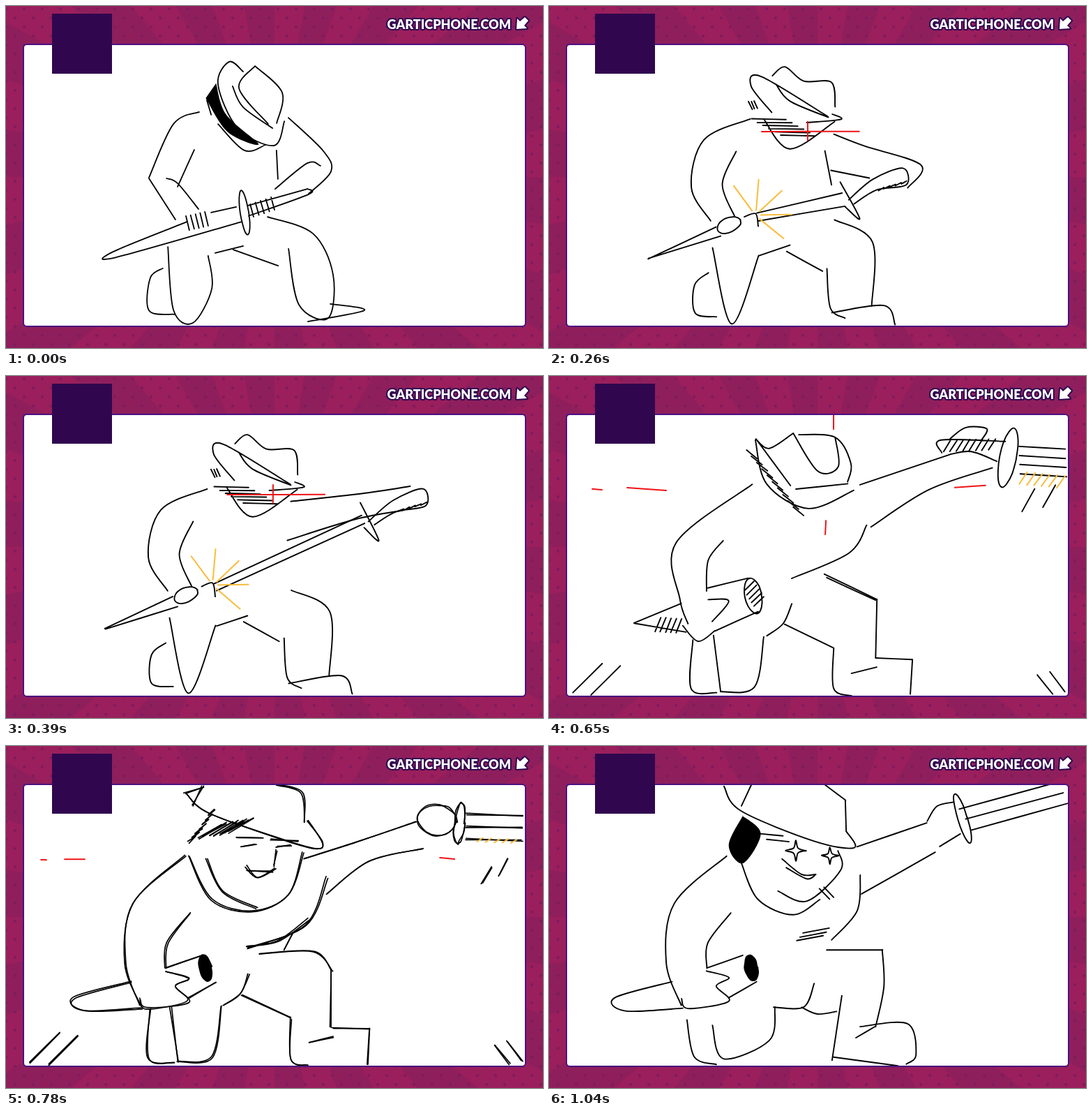
Write an HTML page with a canvas that moves like this. It is 770 by 490 pixels and loops after 1670 ms.

```html
<!DOCTYPE html>
<html lang="en">
<head>
<meta charset="utf-8">
<title>Drawing the sword</title>
<style>
html, body { margin: 0; width: 100%; height: 100%; overflow: hidden; background: #9a1f5c; }
canvas { display: block; }
</style>
</head>
<body>
<canvas id="stage" width="770" height="490"></canvas>
<script>
const STEP = 130, LOOP = 1670, LAST = 8;
const RED = '#ee1418', GOLD = '#f8bd3c', NIGHT = '#30074f';
const ctx = document.getElementById('stage').getContext('2d');

let seed = 1;
const rand = () => (seed = seed * 16807 % 2147483647) / 2147483647;

// A sketch is a list of strokes, a stroke a flat list of coordinates.
const line = s => s.split(';').map(p => p.trim().split(/\s+/).map(Number));
const move = (sketch, dx, dy) => sketch.map(p => p.map((v, i) => v + (i % 2 ? dy : dx)));
const hatch = (x1, y1, x2, y2, dx, dy, n) =>
  Array.from({ length: n }, (_, i) => {
    const k = i / (n - 1), x = x1 + (x2 - x1) * k, y = y1 + (y2 - y1) * k;
    return [x, y, x + dx, y + dy];
  });
const ring = (x, y, rx, ry, tilt) => [Array.from({ length: 13 }, (_, i) => {
  const a = i * Math.PI / 6, u = rx * Math.cos(a), v = ry * Math.sin(a);
  return [x + u * Math.cos(tilt) - v * Math.sin(tilt), y + u * Math.sin(tilt) + v * Math.cos(tilt)];
}).flat()];
const star = (x, y, r) => [Array.from({ length: 9 }, (_, i) => {
  const a = i * Math.PI / 4, d = i % 2 ? r / 3 : r;
  return [x + d * Math.cos(a), y + d * Math.sin(a)];
}).flat()];
const fan = (x, y, from, to, near, far, n) =>
  Array.from({ length: n }, (_, i) => {
    const a = from + (to - from) * i / (n - 1), c = Math.cos(a), s = Math.sin(a);
    return [x + near * c, y + near * s, x + far * c, y + far * s];
  });

// Catmull-Rom curve through the points
function trace(p, shake) {
  const q = p.map(v => v + (rand() - 0.5) * 2 * shake);
  const last = q.length / 2 - 1;
  const at = (i, axis) => q[2 * Math.max(0, Math.min(last, i)) + axis];
  const bend = (i, side, axis) => at(i, axis) + side * (at(i + 1, axis) - at(i - 1, axis)) / 6;
  ctx.moveTo(q[0], q[1]);
  for (let i = 0; i < last; i++) {
    ctx.bezierCurveTo(bend(i, 1, 0), bend(i, 1, 1), bend(i + 1, -1, 0), bend(i + 1, -1, 1), at(i + 1, 0), at(i + 1, 1));
  }
}

function ink(sketch, color, width, shake) {
  ctx.strokeStyle = color;
  ctx.lineWidth = width;
  ctx.beginPath();
  sketch.forEach(p => trace(p, shake));
  ctx.stroke();
}

const kneel = {
  hat: line(`340 94 320 80 304 112 332 175 384 200 399 165; 376 169 334 118 357 86; 357 86 396 124 388 168;
    325 115 340 145 382 175; 304 169 342 207 372 199; 288 135 294 156`),
  shade: line('302 110 316 156 362 198 318 180 286 132'),
  arms: line(`277 152 240 169 205 246; 205 247 243 306; 270 206 246 259; 230 247 246 254 276 291;
    405 160 455 208 466 237 434 269; 451 229 432 225 386 262; 388 207 390 248`),
  sword: [...line('260 309 154 352 158 360 338 309; 346 286 432 262; 432 262 434 270 348 301; 294 296 330 288'),
    ...ring(342, 296, 6, 32, -0.15), ...hatch(258, 301, 285, 295, 5, 20, 5), ...hatch(350, 284, 380, 274, 5, 18, 5)],
  legs: line(`375 302 440 326 469 385 462 447 420 428 405 348; 465 427 514 436 433 452; 300 354 340 344; 326 349 390 372;
    232 345 240 436 268 454 295 405 290 358; 225 376 207 390 205 436 242 442`)
};

const grasp = {
  hat: [...line(`320 152 290 115 304 101 400 158; 320 100 338 87 365 108 405 109 410 145; 406 155 418 162 370 167;
    325 112 345 136 400 159; 308 162 345 205 410 166`),
    ...hatch(286, 137, 294, 136, 5, 11, 3), ...hatch(290, 162, 332, 185, 50, 1, 6)],
  arm: [...line('288 162 222 192 204 260 232 308; 268 208 249 255 267 302'), ...ring(258, 314, 18, 10, -0.4)],
  reach: line('408 184 452 200 534 228 515 260; 404 235 460 246; 396 207 405 256'),
  hand: [...line('430 278 465 248 508 232 512 256 470 264 438 283; 418 252 445 305 424 287'), ...hatch(472, 264, 505, 255, 8, -4, 5)],
  sheath: line('239 316 142 362; 142 362 246 330; 280 302 296 297 300 316'),
  blade: line('298 297 420 268; 300 308 424 287'),
  legs: line(`409 307 464 338 463 430; 341 352 392 380; 399 376 403 432 424 447; 405 440 480 429 496 456; 302 358 346 343;
    235 347 262 455 301 358; 229 382 209 400 209 440 240 445`),
  gold: fan(296, 300, -2.2, 0.7, 8, 52, 5)
};

const turned = line('291 155 182 239 188 320 199 355; 250 236 228 264 226 308');
const dashes = line('408 56 408 76; 397 207 396 227');

const slash = {
  hat: [...line('300 104 345 80 436 118 442 146 385 199 325 158 300 104; 312 100 348 150 440 146; 350 86 370 130 435 124'),
    ...hatch(286, 90, 330, 180, 14, 16, 9)],
  arms: [...line('444 152 560 122 625 110; 442 206 480 196 570 150 640 138'), ...ring(650, 107, 28, 18, -0.2), ...ring(216, 343, 17, 22, 0),
    ...hatch(648, 98, 664, 94, 90, 94, 2)],
  sword: line('232 308 298 293 440 258; 350 309 240 340; 196 354 122 362; 122 362 188 330'),
  cuts: [...hatch(370, 285, 480, 335, 265, -105, 7), ...hatch(345, 290, 440, 262, 120, 48, 4),
    ...hatch(500, 190, 650, 150, -60, 120, 5), ...hatch(470, 205, 600, 148, 6, 26, 10)],
  speed: [...hatch(36, 110, 110, 95, 50, 28, 3), ...hatch(50, 457, 131, 456, 50, -65, 4), ...hatch(643, 378, 700, 395, 40, 46, 2)],
  legs: line(`238 342 250 440 300 425 312 370 348 356 412 388; 404 385 404 440 420 456; 438 312 466 345 466 408;
    466 408 514 440 508 456; 234 373 212 395 218 447 250 445`),
  gold: [...hatch(330, 284, 465, 326, 300, -120, 9), ...hatch(660, 165, 705, 215, 34, -8, 6)],
  red: line('26 163 80 158; 125 159 207 159; 240 156 268 155; 386 432 384 458; 578 146 630 144')
};

const corners = [...hatch(34, 454, 60, 457, 42, -42, 2), ...hatch(700, 428, 718, 424, 22, 28, 2)];
const crouch = line(`236 372 246 452; 206 378 204 448 240 454; 246 452 295 446 308 374; 348 326 336 355 312 372;
  338 356 408 390; 408 390 408 448 434 458; 468 404 521 406; 521 406 518 456; 434 426 470 417`);

const follow = {
  hat: [...line('297 90 316 104 350 82; 297 90 346 157; 358 84 410 88 433 125 428 152; 350 82 385 136 415 130 410 88; 354 162 428 154; 296 92 312 155 372 190 437 164'),
    ...hatch(283, 106, 350, 188, 15, 12, 10)],
  arms: [...line(`446 156 575 112; 462 216 545 163 636 132; 455 214 430 254 348 290; 575 112 605 108 642 122;
    575 90 598 74 628 76 620 92; 563 110 562 92 654 94`), ...hatch(566, 108, 630, 106, 10, -16, 8)],
  blade: [...ring(658, 117, 12, 43, 0.2), ...hatch(674, 101, 676, 140, 66, 4, 4), ...hatch(678, 194, 708, 188, 18, -32, 2)],
  sheath: [...line('228 304 286 290; 300 338 238 365; 192 358 214 380 238 365; 196 367 122 354; 122 354 190 326; 228 320 258 322 234 352'),
    ...ring(293, 315, 12, 26, -0.2), ...hatch(280, 308, 294, 330, 14, -14, 5), ...hatch(152, 366, 182, 368, 8, -20, 5)],
  thigh: line('395 284 470 320; 470 320 468 404; 398 289 468 321'),
  gold: hatch(674, 155, 728, 160, 12, -17, 6),
  red: line('62 162 76 163; 112 160 168 164; 582 160 626 157')
};

const smirk = {
  hat: [...line('258 68 290 95 400 136 444 148 455 138 432 108; 256 68 282 58; 282 58 268 86; 388 56 424 68 428 110'),
    ...hatch(262, 138, 290, 100, 10, -8, 7), ...hatch(276, 132, 320, 124, 34, -20, 7)],
  face: [...line('262 158 295 220 352 237 405 212 426 152; 288 160 310 208 360 232; 344 172 360 188 386 176; 346 178 384 180; 388 150 384 172'),
    ...hatch(338, 143, 388, 145, 20, -3, 2), ...hatch(330, 130, 380, 134, 38, 2, 2)],
  arms: [...line('428 162 500 138 588 108; 460 212 520 165 598 148; 460 188 430 256 345 290; 345 288 390 280 434 248'),
    ...ring(618, 106, 28, 22, 0.1)],
  blade: [...ring(650, 111, 7, 29, 0.1), ...hatch(660, 97, 660, 134, 80, 2, 3), ...hatch(682, 197, 706, 186, 14, -24, 2)],
  thigh: line('362 298 440 294 468 322; 466 322 466 402; 412 268 400 292'),
  gold: hatch(676, 137, 724, 139, 8, -5, 5),
  red: line('50 163 58 163; 84 162 113 162; 622 160 643 162')
};

const shine = {
  hat: [...line('251 58 275 93 380 136 438 146 426 122; 396 56 425 78; 425 78 426 122; 290 56 276 86')],
  hair: line('278 99 304 126 278 168 258 142 278 99'),
  face: [...line(`276 168 300 220 350 242 388 220; 414 150 418 178 370 222 328 208; 334 162 362 184 382 184;
    340 174 370 190 383 184`), ...hatch(303, 126, 312, 134, 32, 3, 2), ...hatch(388, 204, 394, 202, 14, 15, 2)],
  eyes: [...star(354, 150, 15), ...star(403, 157, 12)],
  arms: [...line('442 144 542 110; 542 108 556 86 580 80; 448 212 554 152; 560 144 590 126; 446 185 442 236 405 278'),
    ...hatch(364, 268, 355, 279, 38, -7, 3)],
  blade: [...ring(593, 104, 7, 37, -0.3), ...hatch(588, 90, 606, 120, 140, -38, 3)],
  left: [...line(`255 158 180 226 168 310 190 372; 261 239 228 282 226 318; 226 318 278 300; 298 338 258 360;
    226 322 258 332 240 344 258 366 200 376 190 362; 176 338 94 361 110 380 192 376`)],
  mouth: ring(290, 318, 10, 20, -0.2),
  legs: line(`198 392 208 445 240 456; 234 400 250 448 316 422 324 374; 322 374 365 374 380 340; 362 374 385 384 412 380;
    420 358 406 450; 398 292 478 292; 478 292 480 345 468 402; 446 402 514 398 526 442 512 456; 440 418 468 402; 408 446 500 458`)
};

const calm = [1.8, 0.2, 1], loose = [1.9, 0.6, 1], rough = [1.7, 1.6, 2], firm = [1.9, 0.4, 1];
const cross = line('305 180 445 180; 371 166 371 192');
const k = kneel, g = grasp, s = slash, f = follow, m = smirk, e = shine;

const scenes = [
  { pen: calm, ink: [k.hat, k.arms, k.sword, k.legs], fill: k.shade },
  { pen: calm, ink: [move(k.hat, 2, 4), k.arms, move(k.sword, -3, 2), k.legs], fill: move(k.shade, 2, 4) },
  { pen: loose, ink: [g.hat, g.arm, g.reach, g.hand, g.sheath, g.blade, g.legs], gold: g.gold, red: cross },
  { pen: loose, ink: [move(g.hat, 8, -3), g.arm, line('408 180 510 168 580 158; 404 235 500 205 570 192'),
      move(g.hand, 90, -70), g.sheath, hatch(298, 297, 302, 308, 212, -97, 2), g.legs],
    gold: g.gold, red: move(cross, 12, -10) },
  { pen: rough, ink: [s.hat, s.arms, turned, s.sword, s.cuts, s.speed, s.legs], gold: s.gold, red: [...dashes, ...s.red] },
  { pen: firm, ink: [f.hat, f.arms, turned, f.blade, f.sheath, crouch, f.thigh, corners], gold: f.gold, red: [...dashes, ...f.red] },
  { pen: rough, ink: [m.hat, m.face, m.arms, m.blade, move(e.left, 3, 0), crouch, m.thigh, corners],
    fill: move(e.mouth, -4, 0), gold: m.gold, red: m.red },
  { pen: firm, ink: [e.hat, e.face, e.arms, e.blade, e.left, e.legs], fill: [...e.hair, ...e.mouth] },
  { pen: firm, ink: [e.hat, e.face, e.eyes, e.arms, e.blade, e.left, e.legs], fill: [...e.hair, ...e.mouth] }
];

function backdrop() {
  ctx.fillStyle = '#9a1f5c';
  ctx.fillRect(0, 0, 770, 490);
  ctx.fillStyle = '#8e1f5c';
  for (let i = 0; i < 36; i += 2) {
    const a = i * Math.PI / 18;
    ctx.beginPath();
    ctx.moveTo(385, 245);
    ctx.arc(385, 245, 500, a, a + Math.PI / 18);
    ctx.fill();
  }
  ctx.fillStyle = '#7c1c60';
  for (let r = 0; r < 38; r++) {
    for (let x = r % 2 ? 13 : 0; x < 780; x += 26) {
      ctx.beginPath();
      ctx.arc(x, 4 + r * 13, 2, 0, 7);
      ctx.fill();
    }
  }
}

function panel() {
  ctx.beginPath();
  ctx.roundRect(25, 55, 720, 404, 5);
}

function header() {
  ctx.fillStyle = NIGHT;
  ctx.fillRect(66, 11, 86, 86);
  ctx.font = '900 18px Lato, "Open Sans", sans-serif';
  ctx.textAlign = 'right';
  ctx.strokeStyle = NIGHT;
  ctx.lineWidth = 4;
  ctx.strokeText('GARTICPHONE.COM', 724, 33);
  ctx.fillStyle = '#fff';
  ctx.fillText('GARTICPHONE.COM', 724, 33);
  const arrow = new Path2D('M733 18L737 22L744 16L749 21L743 28L747 32L732 33Z');
  ctx.stroke(arrow);
  ctx.fill(arrow);
}

function paint({ pen: [width, shake, passes], ink: sketches, fill = [], gold = [], red = [] }) {
  seed = 7;
  ctx.lineCap = ctx.lineJoin = 'round';
  backdrop();
  ctx.save();
  panel();
  ctx.fillStyle = '#fff';
  ctx.fill();
  ctx.clip();
  ctx.fillStyle = '#000';
  for (const shape of fill) {
    ctx.beginPath();
    trace(shape, 0.8);
    ctx.fill();
  }
  for (let i = 0; i < passes; i++) sketches.forEach(l => ink(l, '#000', width, shake));
  ink(gold, GOLD, 2, 0.5);
  ink(red, RED, 2, 0.2);
  ctx.restore();
  panel();
  ctx.strokeStyle = '#4b1180';
  ctx.lineWidth = 2;
  ctx.stroke();
  header();
}

let shown = -1;
function tick() {
  const now = Math.min(LAST, Math.floor(performance.now() % LOOP / STEP));
  if (now !== shown) paint(scenes[shown = now]);
  requestAnimationFrame(tick);
}
tick();
</script>
</body>
</html>
```
